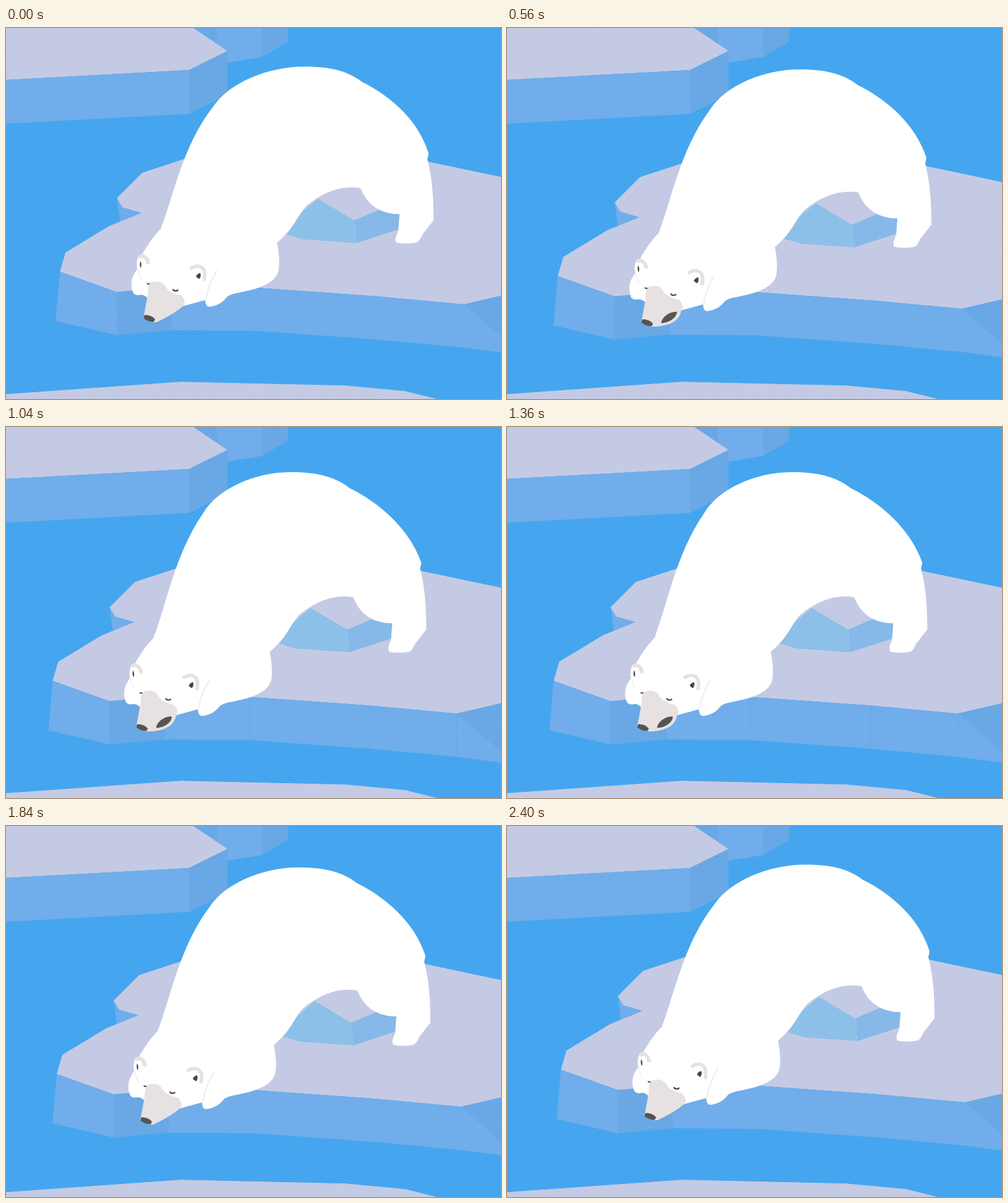
An HTML page with a canvas for the animation above (2.48 s loop, 800 by 600 pixels).

```html
<!DOCTYPE html>
<html lang="en">
<head>
<meta charset="utf-8">
<title>Sleeping bear on the ice</title>
<style>
  html, body { margin: 0; width: 100%; height: 100%; overflow: hidden; background: #45a6ef; }
  canvas { display: block; }
</style>
</head>
<body>
<canvas id="stage" width="800" height="600"></canvas>
<script>
const ctx = document.getElementById('stage').getContext('2d');
const LOOP = 2480, STEP = 80, HALF = 1200;
const WATER = '#45a6ef', TOP = '#c4cae4', FRONT = '#70adea', SIDE = '#69a8e5';
const POOL = '#8dc0e9', POOL_SIDE = '#86b8e8';
const SNOUT = '#e7e1e2', DARK = '#555552', INK = '#444';

const clamp = v => Math.min(1, Math.max(0, v));
const smoothstep = (from, to, t) => {
  const u = clamp((t - from) / (to - from));
  return u * u * (3 - 2 * u);
};
const easeInOut = u => u < 0.5 ? 0.5 * (2 * u) ** 2.4 : 1 - 0.5 * (2 - 2 * u) ** 2.4;

function random(seed) {
  return () => (seed = (seed * 16807) % 2147483647) / 2147483647;
}

function fill(d, color) {
  ctx.fillStyle = color;
  ctx.fill(new Path2D(d));
}

function stroke(d, color, width) {
  ctx.strokeStyle = color;
  ctx.lineWidth = width;
  ctx.stroke(new Path2D(d));
}

// Fine pale grain, shared by all ice.
const grain = new Path2D();
const rand = random(77);
for (let i = 0; i < 2200; i++) grain.rect(840 * rand(), 600 * rand(), 1, 1);

function ice(d, color) {
  ctx.save();
  ctx.clip(new Path2D(d));
  fill(d, color);
  ctx.fillStyle = 'rgba(255,255,255,0.16)';
  ctx.fill(grain);
  ctx.restore();
}

// Walls hanging from the front edge of a slab; edges turned away are darker.
function walls(edge, depth) {
  for (let i = 1; i < edge.length; i++) {
    const [x1, y1] = edge[i - 1], [x2, y2] = edge[i];
    const away = (y2 - y1) / (x2 - x1) < -0.08;
    ice(`M${x1} ${y1} L${x2} ${y2} v${depth} L${x1} ${y1 + depth}Z`, away ? SIDE : FRONT);
  }
}

function drawBackdrop() {
  ice('M303 0 H456 V22 L414 47 L340 59Z', SIDE);
  ice('M341 0 H414 V47 L341 59Z', FRONT);
  walls([[0, 84], [296, 68], [358, 37]], 71);
  ice('M0 0 H303 L358 37 L296 68 L0 84Z', TOP);
  ice('M0 592 L282 572 L548 578 L645 587 L697 600 H0Z', TOP);
}

const floeEdge = [[87, 394], [179, 427], [268, 419], [405, 420], [600, 434], [740, 447]];

function drawFloe() {
  ice('M179 275 L184 313 L225 299Z', FRONT);
  ice('M87 394 L80 474 L179 497Z', FRONT);
  walls(floeEdge, 70);
  ice('M740 447 V517 L830 529 V426Z', FRONT);
  ice('M740 447 L830 525 V426Z', SIDE);
  ice('M290 211 L220 234 L179 275 L188 290 L219 299 L167 320 L96 363 L'
    + floeEdge.join(' L') + ' L830 426 V247 L682 216Z', TOP);
  ice('M440 330 L504 276 L563 311 L566 348 L480 342Z', POOL);
  ice('M563 311 L605 293 L640 299 V324 L566 348Z', POOL_SIDE);
}

// The higher a point of the back, the more a breath pushes it up and forward.
function backPath(breath) {
  const bend = (x, y) => {
    const push = breath * clamp((200 - y) / 138);
    return `${x - 10 * push} ${y - 6 * push} `;
  };
  return 'M250 325 C' + bend(270, 275) + bend(285, 190) + bend(335, 127)
    + bend(362, 87) + bend(425, 63) + bend(480, 62.5)
    + bend(515, 62) + bend(550, 67) + bend(575, 87)
    + bend(620, 109) + bend(667, 149) + bend(683, 203);
}

const legs = 'L681 212 C689 245 691 275 691 311 Q684 320 673 334 Q668 346 663 347'
  + 'Q647 350 631 347 Q627 342 634 328 L636 301 C610 301 585 290 573 259'
  + 'C545 254 515 263 485 288 C470 305 465 325 438 347 Q443 372 441 388'
  + 'Q440 409 408 420 C385 428 365 428 357 435 Q347 449 328 451 Q322 450 322 440';
const head = 'L289 449 L235 466 L229 437 Q222 430 215 432 Q207 433 205 427'
  + 'Q198 408 212 390 Q209 369 220 366 Q237 337 250 325Z';

function drawMouth(open) {
  if (open < 0.02) return;
  const w = 9.5 + 6 * open, h = 7.5 * open;
  ctx.save();
  ctx.translate(267, 459 + 2 * open);
  ctx.rotate(-0.62);
  fill(`M${-w} 0 C${-w * 0.6} ${-h} ${w * 0.5} ${-h} ${w} 0`
    + `C${w * 0.7} ${h} ${-w * 0.4} ${h} ${-w} 0Z`, DARK);
  ctx.restore();
}

function drawFace(open) {
  const dx = 6 * open, dy = 9 * open;
  fill('M233 412 Q250 406 257 417 Q262 428 284 433 Q292 444 287 449'
    + `C${278 + dx} ${457 + dy} ${264 + dx} ${466 + dy} 243 476`
    + 'Q232 476 222 469 L229 432 Q229 416 233 412Z', SNOUT);
  drawMouth(open);
  fill('M224 464 Q235 464 241 471 L239 475 Q230 476 222 469Z', DARK);

  stroke('M215 371 Q221 366 226 372 Q230 376 229.5 382', SNOUT, 6);
  stroke('M213 388 Q214 398 219 408', '#f0eeee', 1.5);
  stroke('M298 390 Q305 384 312 385.5 Q325 389 320 409', SNOUT, 5.5);
  stroke('M341 392 Q326 416 323 440', '#efeded', 2);
  fill('M217 377 Q220 382 218 388 Q215 384 217 377Z', INK);
  fill('M314 396 Q308 398 307 402 L312 406 Q316 402 314 396Z', INK);
  stroke('M269.5 422.5 Q273 427.5 278.5 423.5', INK, 2.2);
  stroke('M228 412.5 Q229.5 415 232 413.5', INK, 2);
}

function draw(now) {
  const t = Math.floor((now % LOOP) / STEP) * STEP;
  const drift = easeInOut(clamp(1 - Math.abs(t - HALF) / HALF));
  const open = smoothstep(80, 480, t) * (1 - smoothstep(1480, 1840, t));

  ctx.fillStyle = WATER;
  ctx.fillRect(0, 0, 800, 600);
  drawBackdrop();
  ctx.save();
  ctx.translate(-12 * drift, 16.8 * drift);
  drawFloe();
  fill(backPath(drift) + legs + head, '#fff');
  drawFace(open);
  ctx.restore();
}

let start;
function tick(now) {
  start ??= now;
  draw(Math.max(0, now - start));
  requestAnimationFrame(tick);
}
draw(0);
requestAnimationFrame(tick);
</script>
</body>
</html>
```
